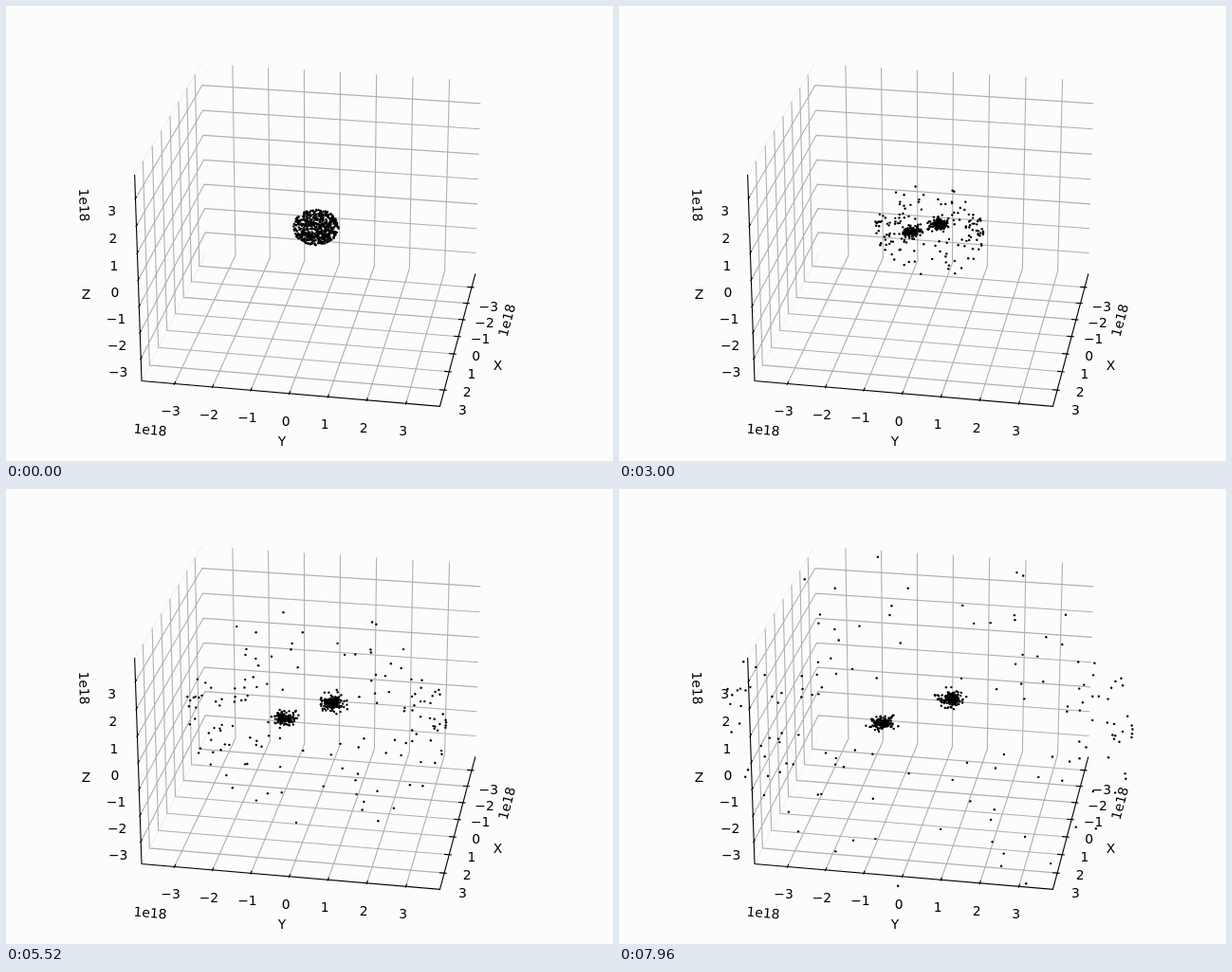
Write an HTML page with a canvas that moves like this. It is 640 px wide and 480 px high and loops after 8 s.

```html
<!DOCTYPE html>
<html lang="en">
<head>
<meta charset="utf-8">
<title>Particle collapse</title>
<style>
  html, body { margin: 0; width: 100%; height: 100%; overflow: hidden; background: #fcfcfc; }
  canvas { display: block; }
</style>
</head>
<body>
<canvas id="stage" width="640" height="480"></canvas>
<script>
const ctx = document.getElementById('stage').getContext('2d');
const LOOP = 8000, STEP = 40;

// Perspective camera; box coordinates run from -1 to 1 on each axis.
const elev = 25 * Math.PI / 180, azim = 10 * Math.PI / 180;
const sinE = Math.sin(elev), cosE = Math.cos(elev);
const sinA = Math.sin(azim), cosA = Math.cos(azim);

function project(bx, by, bz) {
  const x = bx * 0.59524, y = by * 0.59524, z = bz * 0.44643;
  const depth = 10 - (cosE * cosA * x + cosE * sinA * y + sinE * z);
  const right = cosA * y - sinA * x;
  const up = cosE * z - sinE * (cosA * x + sinA * y);
  return [326.5 + 2594.6 * right / depth, 233.5 - 2594.6 * up / depth];
}

function line(color, ...points) {
  ctx.strokeStyle = color;
  ctx.lineWidth = 1.11;
  ctx.beginPath();
  for (const p of points) ctx.lineTo(...project(...p));
  ctx.stroke();
}

function text(label, x, y, angle = 0) {
  ctx.save();
  ctx.translate(x, y);
  ctx.rotate(angle * Math.PI / 180);
  ctx.fillText(label, 0, 5);
  ctx.restore();
}

function tickLabel(k, point) {
  const [x, y] = project(...point);
  text(String(k).replace('-', '\u2212'), x, y + 6.2);
}

function drawAxes() {
  const LIMIT = 3.865;
  const grid = (...p) => line('#b0b0b0', ...p);
  const black = (...p) => line('#000', ...p);
  const labelOut = 1.124, tickIn = 0.967, tickOut = 1.0167;

  for (const z of [1, -1]) line('#f0f0f0', [-1, -1, z], [1, -1, z]);
  for (let k = -3; k <= 3; k++) {
    const v = k / LIMIT;
    grid([v, -1, 1], [v, -1, -1], [v, 1, -1]);
    grid([-1, v, 1], [-1, v, -1], [1, v, -1]);
    grid([1, -1, v], [-1, -1, v], [-1, 1, v]);
  }
  black([1, -1, 1], [1, -1, -1], [1, 1, -1], [-1, 1, -1]);

  ctx.fillStyle = '#000';
  ctx.font = '13.89px "DejaVu Sans", sans-serif';
  ctx.textAlign = 'center';
  for (let k = -3; k <= 3; k++) {
    const v = k / LIMIT;
    black([v, tickIn, -1], [v, tickOut, -1]);
    black([tickIn, v, -1], [tickOut, v, -1]);
    black([tickIn, -1, v], [tickOut, -1, v]);
    tickLabel(k, [v, labelOut, -labelOut]);
    tickLabel(k, [labelOut, v, -labelOut]);
    tickLabel(k, [labelOut, -labelOut, v]);
  }
  text('X', 518.5, 379);
  text('Y', 291, 459);
  text('Z', 84.5, 304);
  text('1e18', 528, 331.5, -75.2);
  text('1e18', 152, 447, 4.9);
  text('1e18', 82.5, 210, 88.2);
}

// Seeded random numbers keep the cloud the same on every load.
let seed = 20731;
function random() {
  seed = (seed + 0x6D2B79F5) | 0;
  let r = Math.imul(seed ^ (seed >>> 15), 1 | seed);
  r = (r + Math.imul(r ^ (r >>> 7), 61 | r)) ^ r;
  return ((r ^ (r >>> 14)) >>> 0) / 4294967296;
}
const mix = (a, b, u) => a + (b - a) * u;
const between = (a, b) => mix(a, b, random());
const smooth = u => { u = Math.min(1, Math.max(0, u)); return u * u * (3 - 2 * u); };
const many = (count, make) => Array.from({ length: count }, make);

const CENTER = { x: 327, y: 233.5 };
const BURST = 1.2, END = 7.96;

function startOffset() {
  const r = Math.pow(random(), 0.52), a = between(0, 2 * Math.PI);
  return { x0: 24 * r * Math.cos(a), y0: 18.8 * r * Math.sin(a) };
}

// Escaping particles form a wide shell, denser at its left and right rims
// and empty around the middle.
function makeEscaper() {
  const side = between(-1, 1);
  const u = Math.sign(side) * Math.pow(Math.abs(side), 0.7);
  const v = mix(0.28 * (1 - Math.abs(u)), 1, Math.pow(random(), 1.7));
  const height = 190 * Math.sqrt(1 - u * u) * (random() < 0.5 ? -v : v);
  return { ...startOffset(), dx: 216 * u + 2, dy: height + 10 + 12 * u };
}

// Bound particles first line up in a bar, then orbit their cluster.
function makeBound(cluster) {
  return {
    ...startOffset(),
    cluster,
    bar: between(-1, 1),
    thick: between(-2, 2),
    radius: 6.8 * Math.pow(-Math.log(1 - 0.985 * random()), 0.7),
    phase: between(0, 2 * Math.PI),
    spin: between(0.8, 2.6)
  };
}

// Cluster positions at the burst in px, speeds in px/s.
const leftCluster = { x: 319, y: 234.4, vx: -6.07, vy: 1.87 };
const rightCluster = { x: 334, y: 233.6, vx: 2.4, vy: -1.85 };

const escapers = many(145, makeEscaper);
const bound = [
  ...many(175, () => makeBound(leftCluster)),
  ...many(215, () => makeBound(rightCluster))
];

function dot(x, y) {
  ctx.beginPath();
  ctx.arc(x, y, 1.2, 0, 2 * Math.PI);
  ctx.fill();
}

function drawParticles(t) {
  const squeeze = Math.pow(Math.max(0, 1 - (t / 1.45) ** 2), 0.6);
  const age = Math.max(0, t - BURST);
  const flight = age / (END - BURST);
  const split = smooth(age / 0.9);
  const settle = smooth((t - 2.2) / 1.2);

  for (const p of escapers) {
    dot(CENTER.x + p.x0 * squeeze + p.dx * flight,
        CENTER.y + p.y0 * squeeze + p.dy * flight);
  }
  for (const p of bound) {
    const c = p.cluster, angle = p.phase + p.spin * t;
    const offX = mix(15 * p.bar, p.radius * Math.cos(angle), settle);
    const offY = mix(-3.6 * p.bar + p.thick, 0.68 * p.radius * Math.sin(angle), settle);
    const x = c.x + c.vx * age + offX, y = c.y + c.vy * age + offY;
    dot(CENTER.x + p.x0 * squeeze + (x - CENTER.x) * split,
        CENTER.y + p.y0 * squeeze + (y - CENTER.y) * split);
  }
}

function frame(now) {
  const t = Math.floor((now % LOOP) / STEP) * STEP / 1000;
  ctx.fillStyle = '#fcfcfc';
  ctx.fillRect(0, 0, 640, 480);
  drawAxes();
  drawParticles(t);
  requestAnimationFrame(frame);
}
requestAnimationFrame(frame);
</script>
</body>
</html>
```
